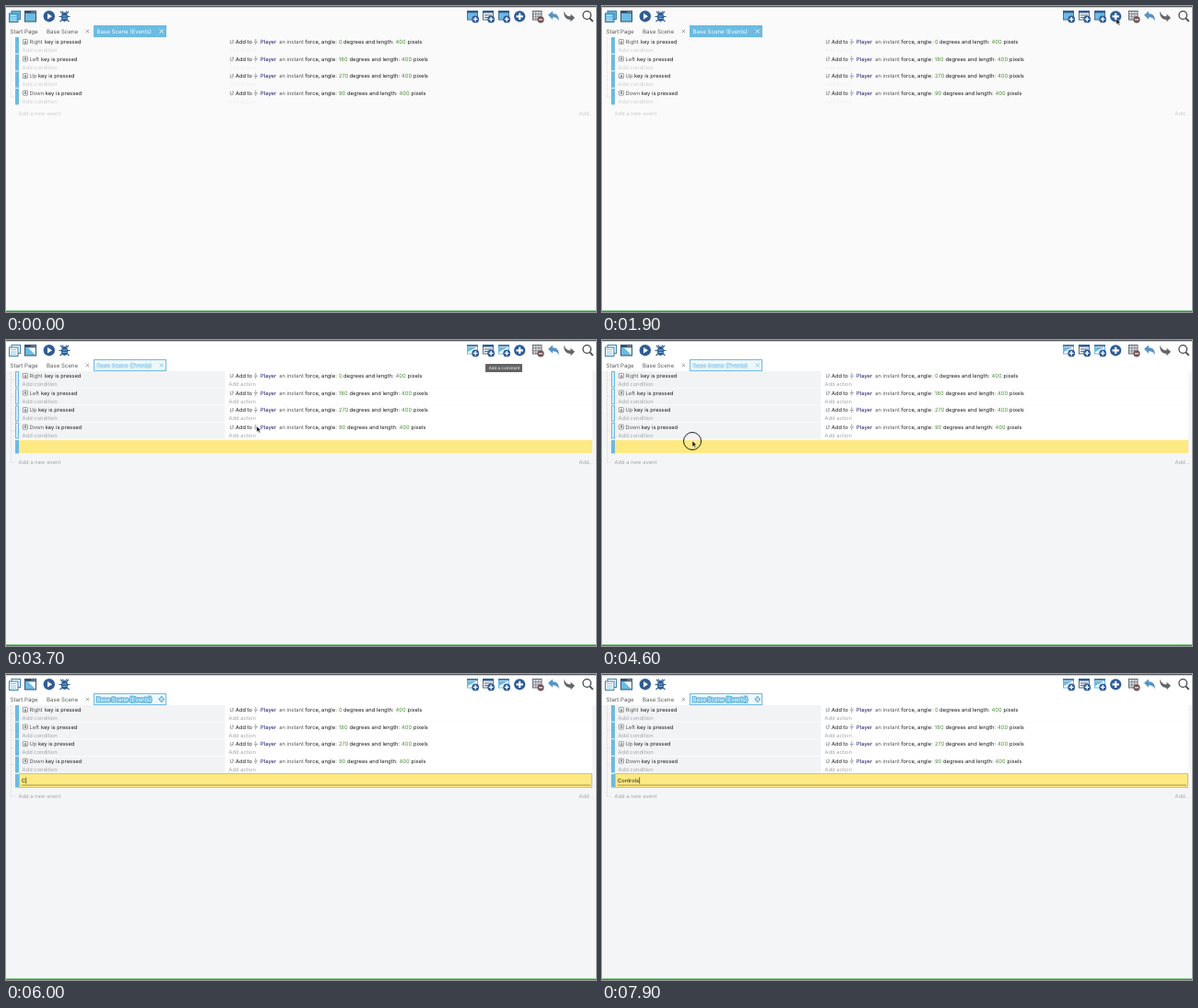
Write an HTML page that moves like this. It is 640 px wide and 333 px high and loops after 8 s.

```html
<!DOCTYPE html>
<html lang="en">
<head>
<meta charset="utf-8">
<title>Event sheet</title>
<style>
html, body { margin: 0; width: 100%; height: 100%; overflow: hidden; background: #fafafa; }
svg { display: block; width: 640px; height: 333px; }
text { font: 5.8px Inter, "Open Sans", sans-serif; fill: #1c1c1c; text-rendering: geometricPrecision; white-space: pre; }
.tab { font-size: 6.1px; fill: #555; }
.soft { fill: #5a5a5a; }
.num { fill: #4b8c38; }
.obj { fill: #33337a; font-weight: 500; }
.faint { fill: #cdcdcd; }
.ghost { fill: #efefef; }
.hint { fill: #a3a5a9; }
</style>
</head>
<body>
<svg id="stage" viewBox="0 0 640 333"></svg>
<script>
const LOOP = 8000, ADDED = 3400, EDIT = 5300;
const BLUE = '#6bbbe2', NAVY = '#305c96', DARK = '#43484f';

const rect = (x, y, w, h, fill, more = '') =>
  `<rect x="${x}" y="${y}" width="${w}" height="${h}" fill="${fill}" ${more}/>`;
const line = (d, stroke, width = 1, more = '') =>
  `<path d="${d}" fill="none" stroke="${stroke}" stroke-width="${width}" ${more}/>`;
const shape = (d, fill) => `<path d="${d}" fill="${fill}"/>`;
const disc = (x, y, r, fill, more = '') => `<circle cx="${x}" cy="${y}" r="${r}" fill="${fill}" ${more}/>`;
const text = (x, y, s, cls = '', more = '') => `<text x="${x}" y="${y}" class="${cls}" ${more}>${s}</text>`;
const group = (id, body) => `<g id="${id}">${body}</g>`;
const at = (x, y, body) => `<g transform="translate(${x} ${y})">${body}</g>`;

// key, angle, shift of the words after the angle, start of the words after the key
const rows = [['Right', 0, 0, 42], ['Left', 180, 6.5, 38], ['Up', 270, 6.5, 35], ['Down', 90, 4, 42.8]];
const rowTop = i => 34 + i * 18.6;

function row([key, angle, dx, keyEnd], i) {
  const y = 41.1 + i * 18.6;
  return rect(18.4, y - 4.7, 5, 5, '#fff', 'stroke="#777" stroke-width=".7" rx=".6"') +
    text(19.4, y - .6, 'A', '', 'style="font-size:4.4px"') +
    text(25.5, y, key, 'soft') + text(keyEnd, y, 'key is pressed') +
    line(`M243.4 ${y - 4}v3.6h3M244.8 ${y - 3.8}h1.8v2h-1.8`, '#8a8a8a', .7) +
    text(249, y, 'Add to') +
    line(`M269 ${y - 2}h4M270.8 ${y - 5}v1.8M270.8 ${y - 1}v1.8`, '#6b7488', .8) +
    text(276, y, 'Player', 'obj') + text(296.2, y, 'an instant', 'soft') +
    text(324.6, y, 'force, angle:') + text(361, y, angle, 'num') +
    text(366 + dx, y, 'degrees and length:') +
    text(422.6 + dx, y, '400', 'num') + text(435.6 + dx, y, 'pixels');
}

const hints = (left, right, endY, end) => rows.map((r, i) => {
  const y = 50 + i * 18.6;
  return text(17.6, y, 'Add condition', left) + text(241.5, y, 'Add action', right);
}).join('') + text(13.5, endY, 'Add a new event', end) + text(621.5, endY, 'Add...', end);

const plus = (x, y, r) => disc(x, y, r, NAVY) +
  line(`M${x - r * .6} ${y}h${r * 1.2}M${x} ${y - r * .6}v${r * 1.2}`, '#fff', r * .36);

const sheet = fill => rect(.5, .5, 11, 9.5, fill, 'stroke="#52718f"') + rect(0, 0, 12, 2.5, NAVY);
const paleSheet = rect(.5, .5, 11, 9.5, '#f6fbfe', `stroke="${BLUE}"`) + rect(0, 0, 12, 2.3, '#4a7fae') +
  shape('M1 3h9l-9 5z', BLUE);
const badge = plus(9.2, 9.4, 3.9);
const listIcon = at(517, 5, sheet('#e8ecef') + line('M2 5h8M2 7.5h5', '#65717d', 1.2) + badge);
const addIcons = body => at(500, 5, body + badge) + at(534, 5, body + badge);

const pages = (fill, ink) =>
  rect(6, 5.5, 9.5, 9, fill, 'stroke="#3d7fa8"') + rect(3.5, 8, 9.5, 9.5, fill, 'stroke="#3d7fa8"') +
  line('M5 10.5h6M5 13h6M5 15.3h6', ink, .8);
const windowIcon = rect(20.5, 5.5, 12, 11.5, BLUE, 'stroke="#34556f"') + rect(20, 5, 13, 3, '#34506e') +
  line('M27.5 6.5h1M29.5 6.5h1M31.3 6.5h.8', '#fff', .8);

const bug = line('M59 6l3 3M68 6l-3 3M57.5 11.5h12M58.5 17l3.5-3M68.5 17l-3.5-3M61 5.5l1.5 2M66 5.5l-1.5 2', NAVY, 1.1) +
  `<ellipse cx="63.5" cy="12" rx="3.6" ry="5" fill="${NAVY}"/>` + line('M61.3 11h4.4M61.3 13.5h4.4', '#8fcdec', .8);

const toolbar = disc(46.8, 11.2, 6.2, NAVY) + shape('M45 8l5 3.2-5 3.2z', '#fff') + bug +
  listIcon + plus(557.2, 11.3, 6.1) +
  rect(571.5, 5.5, 9.5, 9.5, '#d6d9dc', 'stroke="#656a70"') +
  line('M571 8.7h10M571 11.8h10M574.7 5v10M577.9 5v10', '#777c82', .7) +
  disc(580, 14.8, 3.6, '#74545a') + line('M578 14.8h4', '#fff', 1.1) +
  shape('M588 9.8l5-4.3v2.7c5 0 7 3 6.8 8.3-1.4-3.2-3.2-4.2-6.8-4.2v2.5z', '#5794c4') +
  shape('M617 12.8l-4.5-4v2.5c-4 0-6-2-7-5.8-1.2 5.8 2 9.4 7 9.4v2.3z', '#63676b') +
  disc(630.2, 10, 4.3, 'none', `stroke="${DARK}" stroke-width="1.3"`) + line('M633.3 13.3l3.4 3.6', DARK, 1.8);

const tree = (color, endY) => line(`M5.5 34V${endY}` +
  rows.map((r, i) => `M5.5 ${rowTop(i) + 9}h4`).join('') + `M5.5 ${endY}h4`, color, .7, 'stroke-dasharray="1.5 1"');
const bars = color => rows.map((r, i) => rect(10, rowTop(i), 4, 17.6, color)).join('');

const tabName = (fill, stroke, width) => text(98.6, 29.8, 'Base Scene (Events)', '',
  `style="font-size:6.1px;fill:${fill};stroke:${stroke};stroke-width:${width};paint-order:stroke"`);
const tabClose = (color, width) => line('M166.7 25.5l4 4m0-4l-4 4', color, width);
const paleTab = rect(95.5, 21.5, 78, 12, '#f0f7fb', `stroke="${BLUE}"`);

const before = rect(0, 0, 640, 333, '#fafafa') + pages(BLUE, '#d9f0fb') + windowIcon +
  addIcons(sheet(BLUE)) + tree('#dedede', 98.8) + bars(BLUE) +
  rect(95, 21, 79, 13, BLUE) + tabName('#fff', 'none', 0) + tabClose('#fff', .9) +
  hints('faint', 'ghost', 119.3, 'faint');

const after = rect(0, 0, 640, 333, '#f4f5f7') + rect(0, 0, 640, 34, '#fff') +
  pages('#f4fafd', BLUE) + windowIcon + shape('M24 8.5h8v8z', '#f4fafd') + addIcons(paleSheet) +
  rows.map((r, i) => rect(14, rowTop(i), 622, 18.6, '#fff') +
    rect(14, rowTop(i), 223.5, 17.9, '#f2f3f5')).join('') +
  tree('#cfd2d6', 133) + hints('hint', 'hint', 134.8, 'hint') +
  rect(10, 109, 4, 14.5, BLUE);

const idle = rows.map((r, i) => rect(10.5, rowTop(i) + .5, 3, 16.6, '#d8ecf6', `stroke="${BLUE}"`)).join('') +
  paleTab + tabName('#f8fcfe', BLUE, .7) + tabClose(BLUE, .8) + rect(14, 109, 622, 14, '#ffe983');

const editor = bars(BLUE) + paleTab + tabName('#fff', BLUE, 3) + tabClose(BLUE, 4) + tabClose('#fff', .9) +
  rect(14.5, 108.5, 621, 15, '#ffe983', 'stroke="#c9c48c"') +
  line('M17 121h617', '#8a824a', .8);

const typed = [...'Controls'].map(c => `<tspan>${c}</tspan>`).join('');

stage.innerHTML = group('before', before) + group('after', after) + group('idle', idle) +
  group('editor', editor) + toolbar +
  text(4.6, 29.8, 'Start Page', 'tab') + text(44, 29.8, 'Base Scene', 'tab') +
  line('M86.7 25.8l3.4 3.4m0-3.4l-3.4 3.4', '#777', .7) +
  rows.map(row).join('') +
  text(17, 118, typed, '', 'id="typed"') + group('caret', line('M17.4 112.4v7', '#222', .7)) +
  group('tip', rect(520, 26, 40, 9, '#646464', 'rx="1"') +
    text(523.7, 32.1, 'Add a comment', '', 'style="font-size:4.5px;fill:#fff"')) +
  group('pointer', group('ring', disc(0, 0, 9.5, 'none', 'stroke="#222"')) +
    '<path d="M0 0v6l1.5-1.3 1.1 2.4 1.1-.5-1.1-2.3h2z" fill="#111" stroke="#fff" stroke-width=".4"/>') +
  rect(0, 0, 640, 1.3, '#56585b') + rect(0, 331.5, 640, 1.5, '#1fa325');

const play = (el, frames) => el.animate(frames, { duration: LOOP, iterations: Infinity }).startTime = 0;

// visible only inside the given [from, to] spans
function show(el, ...spans) {
  const steps = [[0, 'hidden']];
  for (const [from, to] of spans) steps.push([from, 'visible'], [to, 'hidden']);
  steps.push([LOOP, steps.at(-1)[1]]);
  play(el, steps.map(([t, visibility]) => ({ offset: t / LOOP, visibility, easing: 'step-end' })));
}

const $ = id => document.getElementById(id);
show($('before'), [0, ADDED]);
show($('after'), [ADDED, LOOP]);
show($('idle'), [ADDED, EDIT]);
show($('editor'), [EDIT, LOOP]);
show($('caret'), [EDIT, LOOP]);
show($('tip'), [2950, 4000]);
show($('pointer'), [100, 5600]);
show($('ring'), [3250, 3400], [4500, 4700], [4850, 5050]);

const path = [[0, 350, 290], [100, 350, 290], [500, 440, 170], [950, 522, 52], [1500, 552, 20], [1900, 558, 14],
  [2500, 557, 13], [2850, 541, 12], [3400, 541, 12], [3700, 272, 94], [4150, 112, 112], [4500, 98, 110], [LOOP, 98, 110]];
play($('pointer'), path.map(([t, x, y]) =>
  ({ offset: t / LOOP, transform: `translate(${x}px, ${y}px)`, easing: 'ease-in-out' })));

const keys = [5950, 6200, 6350, 6550, 6700, 6850, 7000, 7100];
const word = $('typed');
[...word.children].forEach((letter, i) => show(letter, [keys[i], LOOP]));
play($('caret'), [0, ...keys, LOOP].map((t, i) => {
  const n = Math.min(i, keys.length);
  const x = n ? word.getSubStringLength(0, n) : 0;
  return { offset: t / LOOP, transform: `translateX(${x}px)`, easing: 'step-end' };
}));
</script>
</body>
</html>
```
